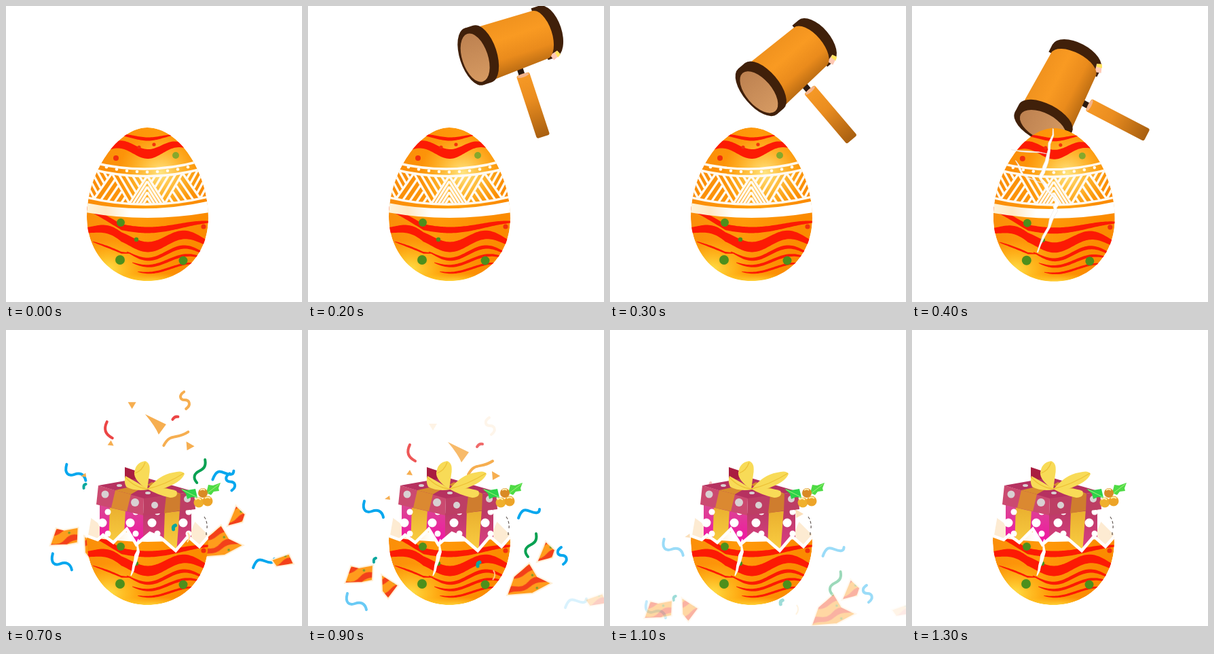
These frames come from a looping animation (436 by 436 pixels, 3.3 s). An HTML page:

```html
<!DOCTYPE html>
<html lang="en">
<head>
<meta charset="utf-8">
<title>Egg surprise</title>
<style>
html, body { margin: 0; width: 100%; height: 100%; overflow: hidden; background: #fff; }
svg { display: block; width: 100vw; height: 100vh; }
</style>
</head>
<body>
<svg viewBox="0 0 436 436">
  <defs>
    <path id="shape" d="M208 179C255 179 298 245 298 312C298 365 262 405 208 405C158 405 119 365 119 310C119 245 165 179 208 179Z"/>
    <clipPath id="inEgg"><use href="#shape"/></clipPath>
    <clipPath id="inStrip"><path d="M115 237Q208 262 302 236L302 281Q208 304 115 281Z"/></clipPath>
    <clipPath id="lower"><path id="lowerArea"/></clipPath>
    <linearGradient id="skin" x2="1" y2=".25">
      <stop offset="0" stop-color="#f98a08"/><stop offset=".55" stop-color="#ff9a0a"/><stop offset="1" stop-color="#fb8b00"/>
    </linearGradient>
    <radialGradient id="shine"><stop offset="0" stop-color="#ffe98a" stop-opacity=".95"/><stop offset="1" stop-color="#ffd040" stop-opacity="0"/></radialGradient>
    <radialGradient id="glow"><stop offset="0" stop-color="#fff25a" stop-opacity=".8"/><stop offset="1" stop-color="#ffd820" stop-opacity="0"/></radialGradient>
    <linearGradient id="sash"><stop offset="0" stop-color="#fff3d8"/><stop offset=".16" stop-color="#ffe9c4"/><stop offset=".35" stop-color="#fff"/></linearGradient>
    <linearGradient id="wood" x2="0" y2="1"><stop offset="0" stop-color="#f0921e"/><stop offset=".35" stop-color="#f99a22"/><stop offset=".7" stop-color="#ea8b1c"/><stop offset="1" stop-color="#b86a12"/></linearGradient>
    <linearGradient id="grip" x2="0" y2="1"><stop offset="0" stop-color="#f79a26"/><stop offset=".4" stop-color="#ea8d20"/><stop offset="1" stop-color="#a85f10"/></linearGradient>
    <linearGradient id="tan" x2="0" y2="1"><stop offset="0" stop-color="#bd8150"/><stop offset="1" stop-color="#d69a62"/></linearGradient>
    <linearGradient id="boxL" x2="0" y2="1"><stop offset="0" stop-color="#d94a92"/><stop offset="1" stop-color="#f806a8"/></linearGradient>
    <linearGradient id="boxR" x2="0" y2="1"><stop offset="0" stop-color="#b93a64"/><stop offset="1" stop-color="#df3f88"/></linearGradient>
    <linearGradient id="gold" x2="0" y2="1"><stop offset="0" stop-color="#e9ae2e"/><stop offset="1" stop-color="#fbd043"/></linearGradient>
    <pattern id="peel" width="40" height="20" patternUnits="userSpaceOnUse" patternTransform="rotate(-20)">
      <rect width="40" height="20" fill="#ff9c1c"/>
      <path d="M0 4Q10 -2 20 4T40 4V12Q30 16 20 12T0 12Z" fill="#f3401a"/>
      <circle cx="9" cy="17" r="1.8" fill="#6f9d2c"/>
    </pattern>
    <g id="egg" clip-path="url(#inEgg)">
      <use href="#shape" fill="url(#skin)"/>
      <ellipse cx="150" cy="388" rx="58" ry="44" fill="url(#glow)"/>
      <ellipse cx="215" cy="407" rx="70" ry="14" fill="url(#glow)"/>
      <ellipse cx="228" cy="246" rx="62" ry="58" fill="url(#shine)"/>
      <g id="waves" fill="#fc1a04"/>
      <g id="spots"/>
      <path d="M118 290Q208 308 300 287L300 304Q208 320 118 304Z" fill="url(#sash)"/>
      <g fill="none" stroke="#fffaf0" stroke-width="3.4">
        <path d="M130 231Q208 250 284 229"/>
        <path d="M124 240Q208 262 292 239"/>
        <path d="M115 281Q208 304 302 280"/>
        <path id="hatch" clip-path="url(#inStrip)"/>
      </g>
      <g id="pearls" fill="#fffaf0"/>
    </g>
  </defs>

  <g id="hammer">
    <rect x="49" y="36" width="9" height="14" rx="2" fill="#2c1a10"/>
    <rect x="45" y="48" width="20" height="97" rx="3" fill="url(#grip)"/>
    <ellipse cx="55" cy="50" rx="9" ry="2.6" fill="#f3b48c"/>
    <path d="M97 -40L109 -40A21 40 0 0 1 109 40L97 40Z" fill="#40200a"/>
    <path d="M102 34L114 31L117 38L105 43Z" fill="#ffc9b4"/>
    <path d="M110 33L114 31L117 38L112 41Z" fill="#ffe45c"/>
    <path d="M4 -39L97 -36A18 37 0 0 1 97 38L4 43Z" fill="url(#wood)"/>
    <path d="M-5 -43L8 -43A21 44 0 0 1 8 45L-5 45Z" fill="#40200a"/>
    <ellipse cx="-5" cy="1" rx="21" ry="44" fill="#40200a"/>
    <ellipse cx="-4" cy="3" rx="19" ry="37" fill="url(#tan)"/>
  </g>

  <g id="confetti"></g>

  <g id="whole">
    <use href="#egg"/>
    <g id="cracks" fill="#fff" stroke="#e9e4e4" stroke-width=".6"></g>
  </g>

  <g id="opened">
    <path d="M119 306L124 276L139 287L143 308L130 315ZM262 320L279 281L297 299L297 308L285 322Z" fill="#fdebd2"/>
    <path d="M124 276L119 305M279 281L297 299" fill="none" stroke="#fff" stroke-width="3"/>
    <path d="M292 275Q297 283 296 292M295 298V305" fill="none" stroke="#3a2d28" stroke-dasharray="4 3"/>
    <path d="M175 202L196 209L205 228L175 222Z" fill="#a91d40"/>
    <path d="M138 255L202 270V330H138Z" fill="url(#boxL)"/>
    <path d="M202 270L273 262V330H202Z" fill="url(#boxR)"/>
    <path d="M153 258L176 264L173 320H151Z" fill="url(#gold)"/>
    <path d="M234 266L256 264L251 328L232 322Z" fill="url(#gold)"/>
    <g id="boxDots"></g>
    <path d="M136 229L204 217L277 238L203 249Z" fill="#b63160"/>
    <path d="M136 229L203 248L202 273L133 257Z" fill="#cb4a70"/>
    <path d="M203 248L277 238L279 264L202 273Z" fill="#bd3e64"/>
    <path d="M161 236L184 242L178 267L155 262Z" fill="#db8931"/>
    <path d="M236 244L257 241L256 266L233 270Z" fill="#cf7d2e"/>
    <path d="M161 236L205 226L236 244L257 241L215 224L184 242Z" fill="#d98c2d"/>
    <g fill="#d8d1d2">
      <circle cx="146" cy="242" r="5.5"/><circle cx="190" cy="254" r="6"/>
      <circle cx="219" cy="258" r="5"/><circle cx="267" cy="249" r="5"/>
      <ellipse cx="167" cy="229" rx="4" ry="2"/><ellipse cx="209" cy="240" rx="4" ry="2"/>
    </g>
    <g fill="#f8db57">
      <path d="M208 235Q188 221 189 210Q191 195 205 193Q214 196 211 213Z"/>
      <path d="M209 235Q190 238 177 231Q173 223 176 215Q193 224 209 235Z"/>
      <path d="M208 235Q226 213 246 210Q260 206 263 212Q258 225 230 234Z"/>
      <path d="M208 234Q235 231 251 237Q255 246 242 247Q223 243 208 234Z"/>
    </g>
    <path d="M205 195Q201 207 190 211M176 217Q189 232 208 234Q235 228 262 211" fill="none" stroke="#edc136" stroke-width="1.3"/>
    <path d="M257 234L267 236L279 234L282 247L274 246L267 249L265 241Z" fill="#2dd34a"/>
    <path d="M295 240L298 228L305 229L316 225L313 233L314 237L306 238L302 243Z" fill="#4edb45"/>
    <path d="M259 235L281 246M297 240L314 227" stroke="#a5f27a"/>
    <circle cx="290" cy="240" r="7" fill="#d98a25"/>
    <circle cx="284" cy="254" r="7.5" fill="#f0b02c"/>
    <circle cx="297" cy="252" r="7.5" fill="#eda428"/>
    <path d="M286 236Q290 233 293 236M279 250Q283 246 287 250M293 248Q297 245 301 248" fill="none" stroke="#fff1b5" stroke-width="2"/>
    <g clip-path="url(#inEgg)">
      <use href="#egg" clip-path="url(#lower)"/>
      <path id="rim" fill="none" stroke="#fff" stroke-width="4.5"/>
      <g id="slit" fill="#fff"></g>
    </g>
  </g>

  <g id="front"></g>
</svg>
<script>
const $ = id => document.getElementById(id);
let seed = 7;
const rand = () => (seed = seed * 16807 % 2147483647) / 2147483647;
const mix = (a, b, u) => a + (b - a) * u;

function add(parent, tag, attrs) {
  const el = document.createElementNS('http://www.w3.org/2000/svg', tag);
  for (const k in attrs) el.setAttribute(k, attrs[k]);
  return parent.appendChild(el);
}
const circle = (parent, cx, cy, r, fill) => add(parent, 'circle', { cx, cy, r, fill });

// cosine band, lowest near the middle of the egg, thin at both ends
function wave(x0, x1, y, amp, half, width) {
  const top = [], bottom = [];
  for (let x = x0; x <= x1; x += 2) {
    const lift = Math.max(0, 170 - x) * (y > 300 ? 0.4 : 0);
    const mid = y + amp * Math.cos((x - 209) / half * Math.PI) - lift;
    const w = width / 2 * Math.sqrt(Math.sin(Math.PI * (x - x0 + 1) / (x1 - x0 + 2)));
    top.push([x, mid - w]);
    bottom.unshift([x, mid + w]);
  }
  add($('waves'), 'path', { d: 'M' + top.concat(bottom).join('L') + 'Z' });
}
wave(140, 266, 211, 7, 42, 14);
wave(166, 244, 193, 3, 42, 5);
wave(90, 304, 324, 6, 95, 9);
wave(100, 316, 346, 9, 54, 15);
wave(128, 184, 364, 1, 54, 3);
for (let i = 0; i < 3; i++) wave(178 + 8 * i, 304 - 10 * i, 364 + 11 * i, 9 - i, 54 + 6 * i, 5.5 - i);

const GREENS = '#4d8f1c', REDS = '#f2300c';
[[169, 319, 6], [168, 374, 7], [261, 375, 6.5], [192, 344, 3.2], [250, 220, 5]]
  .forEach(p => circle($('spots'), ...p, p[1] < 240 ? '#86a82c' : GREENS));
[[162, 224, 4], [196, 208, 2.6], [218, 204, 2.6], [291, 325, 3.6]]
  .forEach(p => circle($('spots'), ...p, REDS));
for (let i = -4; i <= 4; i++) circle($('pearls'), 208 + i * 15, 244.5 - i * i * 0.45, 2.3, '#fffaf0');

// woven strip: alternating hatched triangles, mirrored about x = 208
const W = 26, H = 42;
let weave = '';
function seg(x1, y1, x2, y2) {
  const bend = x => ((x - 208) / 85) ** 2 * 10;
  for (const flip of [x => x, x => 416 - x])
    weave += `M${flip(x1)} ${y1 - bend(x1)}L${flip(x2)} ${y2 - bend(x2)}`;
}
for (let d = 0; d < 2 * W; d += 10) {
  const f = 1 - d / (2 * W), dx = W * f, dy = H * f;
  seg(130 + d, 292, 130 + d + dx, 292 - dy);
  for (const x of [104, 156]) seg(x + d, 250, x + d + dx, 250 + dy);
  seg(182 + d / 2, 292, 208, 292 - dy);
}
$('hatch').setAttribute('d', weave);

// jagged crack through key points
function crack(parent, pts, width) {
  const left = [], right = [];
  const n = (pts.length - 1) * 4;
  for (let i = 0; i <= n; i++) {
    const k = Math.min(i >> 2, pts.length - 2), u = i / 4 - k;
    const jig = i % 4 ? (rand() - 0.5) * 5 : 0;
    const x = mix(pts[k][0], pts[k + 1][0], u) + jig, y = mix(pts[k][1], pts[k + 1][1], u) - jig / 2;
    const w = width * (0.2 + 0.5 * Math.sin(Math.PI * i / n)) * (0.7 + 0.5 * rand());
    left.push([x - w, y - w / 2]);
    right.unshift([x + w, y + w / 2]);
  }
  add(parent, 'path', { d: 'M' + left.concat(right).join('L') + 'Z' });
}
crack($('cracks'), [[207, 180], [199, 222], [188, 252], [214, 288], [204, 314], [184, 362]], 4.2);
crack($('cracks'), [[146, 211], [198, 217]], 2.6);
crack($('cracks'), [[152, 227], [168, 252], [192, 260]], 3.2);
crack($('slit'), [[195, 308], [192, 333], [184, 362]], 3.6);

const edge = '116 302L135 309L143 302L158 313L178 293L192 316L212 299L228 306L250 325L268 304L285 319L300 302';
$('rim').setAttribute('d', 'M' + edge);
$('lowerArea').setAttribute('d', `M${edge}L300 410L116 410Z`);

for (const x of [146, 187, 219, 265])
  for (let i = 0; i < 3; i++)
    circle($('boxDots'), x + (i % 2 ? -4 : 4), 268 + 16 * i, i % 2 ? 6.5 : 4.5, '#fff');

// a flying part spreads from the egg, peaks, reaches (x, y), then sinks and fades
const flying = [];
function fly(el, x, y, alpha = 1, from) {
  const [sx, sy] = from || [mix(208, x, 0.8), mix(230, y, 0.8)];
  const sink = y + 56 > 230 && alpha > 0.2;
  flying.push({ el, track: [
    from && [sx, sy, 1],
    [mix(sx, x, 0.6), mix(sy, y, 0.6) - 45, 1],
    [x, y, alpha],
    sink && [mix(208, x, 1.03), Math.min(y + 56, 412), alpha * 0.4]
  ] });
}
const ribbon = (d, color, ...path) => fly(add($('confetti'), 'path',
  { d, fill: 'none', stroke: color, 'stroke-width': 4, 'stroke-linecap': 'round' }), ...path);
const chip = (d, color, ...path) => fly(add($('confetti'), 'path', { d, fill: color }), ...path);
const shard = (d, ...path) => fly(add($('confetti'), 'path',
  { d, fill: 'url(#peel)', stroke: '#fff0d8', 'stroke-width': 2 }), ...path);

const BLUE = '#05a7ee', GREEN = '#08a152', TEAL = '#0aa79e', RED = '#ec4545', SAND = '#f6ae50';
const hook = 'M-14 -12C-18 2 -11 6 -3 3S12 2 14 12';
const snake = 'M-1 -12C-9 -7 -7 0 0 0S10 7 2 13';
const swirl = 'M7 -17C9 -6 4 -3 -2 0S-12 9 -5 17';
const arch = 'M-16 7C-11 -7 -6 -6 1 -3S15 1 15 -6';
const arc = 'M-2 -12Q-10 4 6 12';
const dash = 'M2 -3Q-2 -2 -1 3';
const tri = 'M-6 -5L6 -5L0 5Z';

ribbon(swirl, GREEN, 329, 317, 1, [222, 157]);
ribbon(snake, BLUE, 374, 332, 1, [265, 173]);
ribbon(hook, BLUE, 97, 264, 1, [113, 241]);
ribbon(arch, BLUE, 326, 270, 1, [312, 241]);
ribbon(arc, RED, 152, 181, .9, [149, 209]);
ribbon(dash, TEAL, 98, 339, 1, [142, 179]);
ribbon('M-18 10C-8 -9 0 2 18 -10', SAND, 254, 203);
ribbon(hook, BLUE, 72, 400, .6);
ribbon('M-4 2Q-1 -3 4 -2', RED, 253, 170, .8);
ribbon(arch, BLUE, 395, 402, .15);
ribbon(snake, SAND, 268, 141, .12);
chip(tri, SAND, 184, 143, .15, [188, 176]);
chip('M-4 2L3 -3L4 3Z', SAND, 117, 247, 1, [110, 276]);
chip('M-16 -15L15 0L4 15Q-1 3 -16 -15Z', SAND, 222, 180, .85);
chip('M-5 -6L7 1L-4 7Z', SAND, 276, 214);
chip('M0 -4L4 4L-5 3Z', SAND, 150, 210);
shard('M-21 13L-12 -13L0 -10L21 -14L20 9L5 12Z', 75, 360);
shard('M-12 -18L13 -2L-2 18L-11 7Z', 120, 378);
shard('M-30 24L-20 -4L3 -24L15 -4L36 6L8 21Z', 323, 367);
shard('M-13 16L0 -15L14 -2L10 10Z', 350, 326);
shard('M-13 0L13 -9L20 6L-6 10Z', 421, 397, .25);
fly(add($('front'), 'path', { d: 'M2 -3Q-2 -2 -1 3', fill: 'none', stroke: TEAL, 'stroke-width': 5, 'stroke-linecap': 'round' }), 251, 345);
fly(add($('front'), 'path', { d: 'M0 -7Q5 0 -1 7', fill: 'none', stroke: '#ffd9a0', 'stroke-width': 2 }), 273, 361, .8);

const STEPS = [0, 200, 300, 400, 600, 700, 900, 1100, 1300];
const LOOP = 3300;
const show = (el, on) => el.style.display = on ? '' : 'none';
let last = -1;

function pose(step) {
  const swinging = step >= 1 && step <= 3;
  show($('hammer'), swinging);
  if (swinging) {
    const u = (step - 1) / 2;
    $('hammer').setAttribute('transform',
      `translate(${mix(249, 192, u)} ${mix(72, 172, u)}) rotate(${mix(-18.3, -62.5, u)})`);
  }
  show($('whole'), step < 5);
  show($('cracks'), step >= 3);
  $('whole').setAttribute('transform', step >= 3 ? 'translate(.8 .8)' : '');
  show($('opened'), step >= 5);
  for (const { el, track } of flying) {
    const p = track[step - 4];
    show(el, p);
    if (!p) continue;
    el.setAttribute('transform', `translate(${p[0]} ${p[1]})`);
    el.setAttribute('opacity', p[2]);
  }
}

function draw() {
  const t = performance.now() % LOOP;
  const step = STEPS.findLastIndex(s => s <= t);
  if (step !== last) pose(last = step);
  requestAnimationFrame(draw);
}
draw();
</script>
</body>
</html>
```
